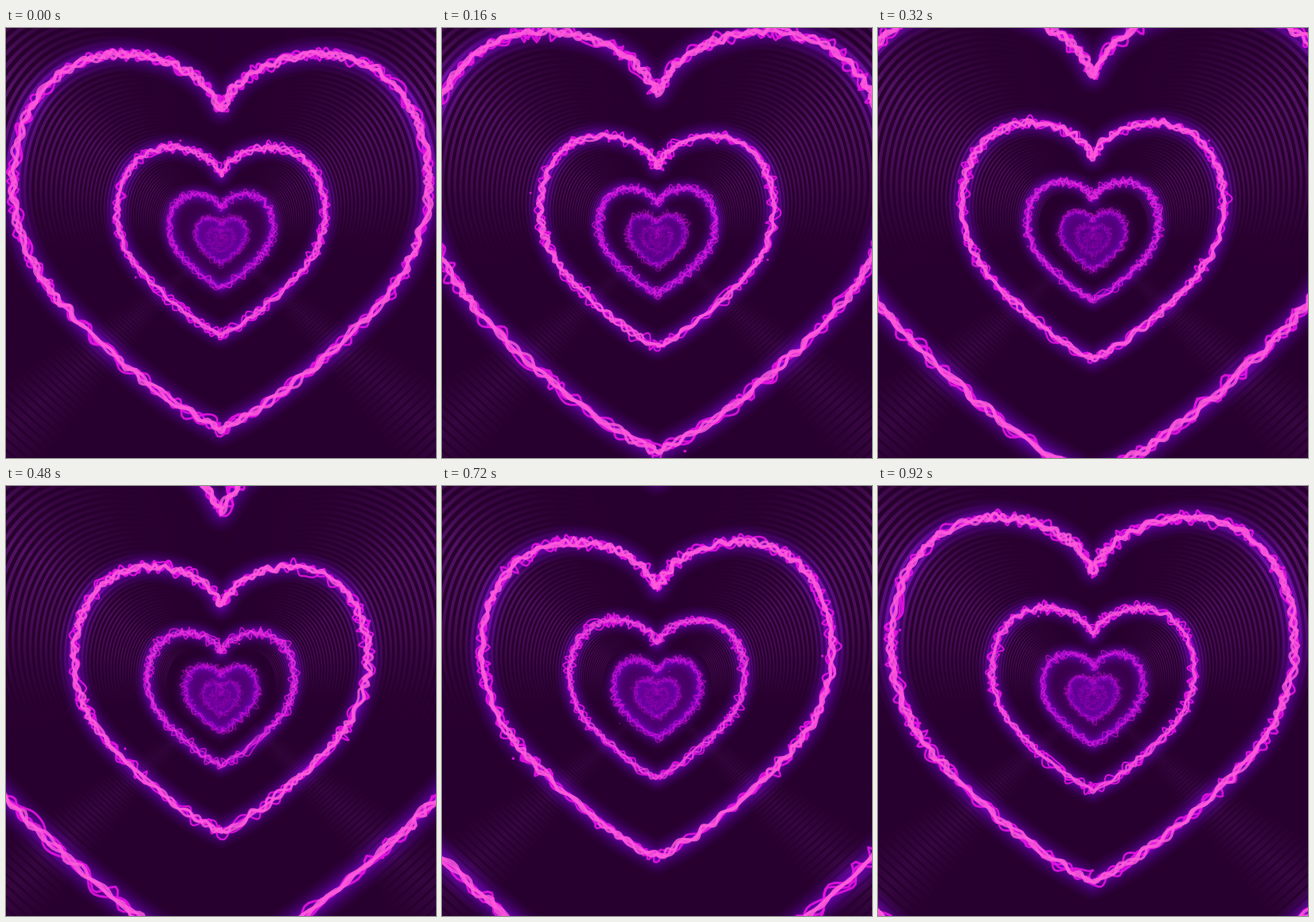
Write an HTML page with a canvas that moves like this. It is 540 px wide and 540 px high and loops after 960 ms.

```html
<!DOCTYPE html>
<html lang="en">
<head>
<meta charset="utf-8">
<title>Neon heart tunnel</title>
<style>
html, body { margin: 0; width: 100%; height: 100%; overflow: hidden; background: #28002f; }
canvas { display: block; width: 100%; height: 100%; }
</style>
</head>
<body>
<canvas id="stage" width="540" height="540"></canvas>
<script>
const SIZE = 540, CX = 270, CY = 267, LOOP = 960, STEP = 40;
const ctx = document.getElementById('stage').getContext('2d');

// Right half of the heart from notch to tip, relative to the centre.
const HALF = [
  [0, -166], [22, -197], [60, -221], [105, -233], [145, -233], [192, -216],
  [228, -183], [251, -138], [261, -83], [257, -30], [238, 24], [210, 67],
  [170, 110], [115, 160], [55, 206], [0, 237]
];
const PER = 20;

function spline(a, b, c, d, t) {
  return 0.5 * (2 * b + (c - a) * t + (2 * a - 5 * b + 4 * c - d) * t * t
    + (3 * b - a - 3 * c + d) * t * t * t);
}

// Points with unit normals, all the way round.
function buildHeart() {
  const right = [], last = HALF.length - 1;
  const at = i => HALF[clamp(i, 0, last)];
  for (let i = 0; i < last; i++) {
    for (let j = 0; j < PER; j++) {
      right.push([0, 1].map(n =>
        spline(at(i - 1)[n], at(i)[n], at(i + 1)[n], at(i + 2)[n], j / PER)));
    }
  }
  right.push(HALF[last]);
  const left = right.slice(1, -1).reverse().map(([x, y]) => [-x, y]);
  const all = right.concat(left), n = all.length;
  return all.map(([x, y], i) => {
    const a = all[(i + n - 2) % n], b = all[(i + 2) % n];
    const dx = b[0] - a[0], dy = b[1] - a[1], len = Math.hypot(dx, dy) || 1;
    return { x, y, nx: dy / len, ny: -dx / len };
  });
}

const smooth = t => t * t * (3 - 2 * t);
const mix = (a, b, t) => a + (b - a) * t;
const clamp = (v, lo, hi) => Math.max(lo, Math.min(hi, v));
const ramp = (v, lo, hi) => smooth(clamp((v - lo) / (hi - lo), 0, 1));

function hash(x, y, seed) {
  let h = Math.imul(x, 374761393) + Math.imul(y, 668265263) + Math.imul(seed, 974634777);
  h = Math.imul(h ^ (h >>> 13), 1274126177);
  h = Math.imul(h ^ (h >>> 16), 2246822519);
  return ((h ^ (h >>> 15)) >>> 0) / 2147483648 - 1;
}

function noise(x, y, seed) {
  const i = Math.floor(x), j = Math.floor(y);
  const u = smooth(x - i), v = smooth(y - j);
  return mix(
    mix(hash(i, j, seed), hash(i + 1, j, seed), u),
    mix(hash(i, j + 1, seed), hash(i + 1, j + 1, seed), u), v);
}

const heart = buildHeart();

function outline(s) {
  const path = new Path2D();
  for (let i = 0; i < heart.length; i += 4) {
    path.lineTo(CX + heart[i].x * s, CY + heart[i].y * s);
  }
  path.closePath();
  return path;
}

// One wavy strand that winds around the heart.
function strand(s, age, amp, seed) {
  const path = new Path2D(), waves = 53 * Math.pow(s, 0.45);
  const step = s > 0.1 ? 1 : 2;
  const time = age * 9 + seed * 0.37;
  for (let i = 0; i < heart.length; i += step) {
    const p = heart[i], u = (i / heart.length - 0.5) * waves;
    const phase = 6.283 * (u + 0.7 * noise(u * 0.7, time, seed)) + seed * 2.1;
    const swell = 0.75 + 0.75 * noise(u * 0.8, time, seed + 70);
    const off = amp * (swell * Math.sin(phase) + 0.35 * noise(u * 1.3, time, seed + 20));
    const slip = amp * 0.7 * noise(u * 1.5, time, seed + 35);
    path.lineTo(
      CX + p.x * s + p.nx * off - p.ny * slip,
      CY + p.y * s + p.ny * off + p.nx * slip);
  }
  path.closePath();
  return path;
}

// Faint echo rings, seen only in a few wedges around the centre.
function buildRings() {
  const layer = document.createElement('canvas');
  layer.width = layer.height = SIZE;
  const g = layer.getContext('2d');
  for (let n = -46; n < 26; n++) {
    const s = Math.pow(2, n / 24);
    g.lineWidth = 4 * s;
    g.strokeStyle = `rgba(125,35,150,${clamp(0.25 + s * 0.25, 0, 0.5)})`;
    g.stroke(outline(s));
  }
  const wedge = g.createConicGradient(0, CX, CY);
  const stops = [
    [0, 0.03], [33, 0], [42, 0.35], [51, 0], [129, 0], [138, 0.35], [147, 0], [178, 0.03],
    [190, 0.3], [204, 0.8], [217, 1], [229, 0.35], [243, 0.04], [270, 0],
    [297, 0.04], [311, 0.35], [323, 1], [336, 0.8], [350, 0.3], [360, 0.03]
  ];
  for (const [deg, a] of stops) wedge.addColorStop(deg / 360, `rgba(0,0,0,${a})`);
  g.globalCompositeOperation = 'destination-in';
  g.fillStyle = wedge;
  g.fillRect(0, 0, SIZE, SIZE);
  return layer;
}
const rings = buildRings();

// Soft halo from stacked strokes that add up towards the line.
function drawGlow(s) {
  const base = outline(s), reach = 46 * clamp(Math.pow(s, 0.3), 0.4, 1.1);
  const layers = 10;
  ctx.globalCompositeOperation = 'lighter';
  ctx.globalAlpha = ramp(s, 0.03, 0.3);
  for (let n = 1; n <= layers; n++) {
    const f = n / layers;
    ctx.lineWidth = reach * Math.pow(f, 1.25);
    ctx.strokeStyle = `rgb(${Math.round(14 - 11 * f)},0,${Math.round(25 - 18 * f)})`;
    ctx.stroke(base);
  }
  ctx.globalAlpha = ramp(s, 0.05, 0.14) * (1 - ramp(s, 0.16, 0.31));
  ctx.fillStyle = 'rgb(42,0,72)';
  ctx.fill(base);
  ctx.globalCompositeOperation = 'source-over';
}

function drawSparks(s, age, w) {
  const turn = Math.floor(age * 12);
  for (let n = 0; n < 2; n++) {
    const i = Math.floor((hash(turn, n, 5) + 1) / 2 * heart.length) % heart.length;
    ctx.beginPath();
    ctx.arc(
      CX + heart[i].x * s + 13 * hash(turn, n, 6),
      CY + heart[i].y * s + 13 * hash(turn, n, 7), w * 0.7, 0, 7);
    ctx.fill();
  }
}

function drawStrands(s, age) {
  const amp = 7.6 * Math.pow(s, 0.27);
  const w = clamp(2.7 * Math.pow(s, 0.4), 0.9, 3);
  const alpha = clamp(0.1 + 2 * s, 0, 1);

  ctx.globalAlpha = alpha * 0.9;
  ctx.lineWidth = w;
  ctx.strokeStyle = ctx.fillStyle = 'rgb(228,18,226)';
  for (let n = 0; n < 3; n++) ctx.stroke(strand(s, age, amp, 1 + n * 3));
  if (s > 0.2) drawSparks(s, age, w);

  const core = ramp(s, 0.05, 0.6);
  ctx.globalAlpha = alpha * mix(0.4, 0.8, core);
  ctx.lineWidth = w * mix(0.9, 1.3, core);
  ctx.strokeStyle = `rgb(${mix(200, 255, core)},${mix(20, 92, core)},${mix(200, 218, core)})`;
  for (let n = 0; n < 3; n++) ctx.stroke(strand(s, age, amp * 0.55, 14 + n * 4));
}

function draw(ms) {
  const p = (Math.floor(ms / STEP) * STEP % LOOP) / LOOP;
  ctx.globalCompositeOperation = 'source-over';
  ctx.globalAlpha = 1;
  ctx.fillStyle = '#28002f';
  ctx.fillRect(0, 0, SIZE, SIZE);
  ctx.drawImage(rings, 0, 0);
  ctx.lineJoin = 'round';
  for (let k = -6; k <= 0; k++) drawGlow(Math.pow(2, k + p));
  for (let k = -6; k <= 0; k++) drawStrands(Math.pow(2, k + p), k + p);
}

const start = performance.now();
let shown = -1;
function tick() {
  const now = performance.now() - start, step = Math.floor(now / STEP);
  if (step !== shown) {
    shown = step;
    draw(now);
  }
  requestAnimationFrame(tick);
}
tick();
</script>
</body>
</html>
```
